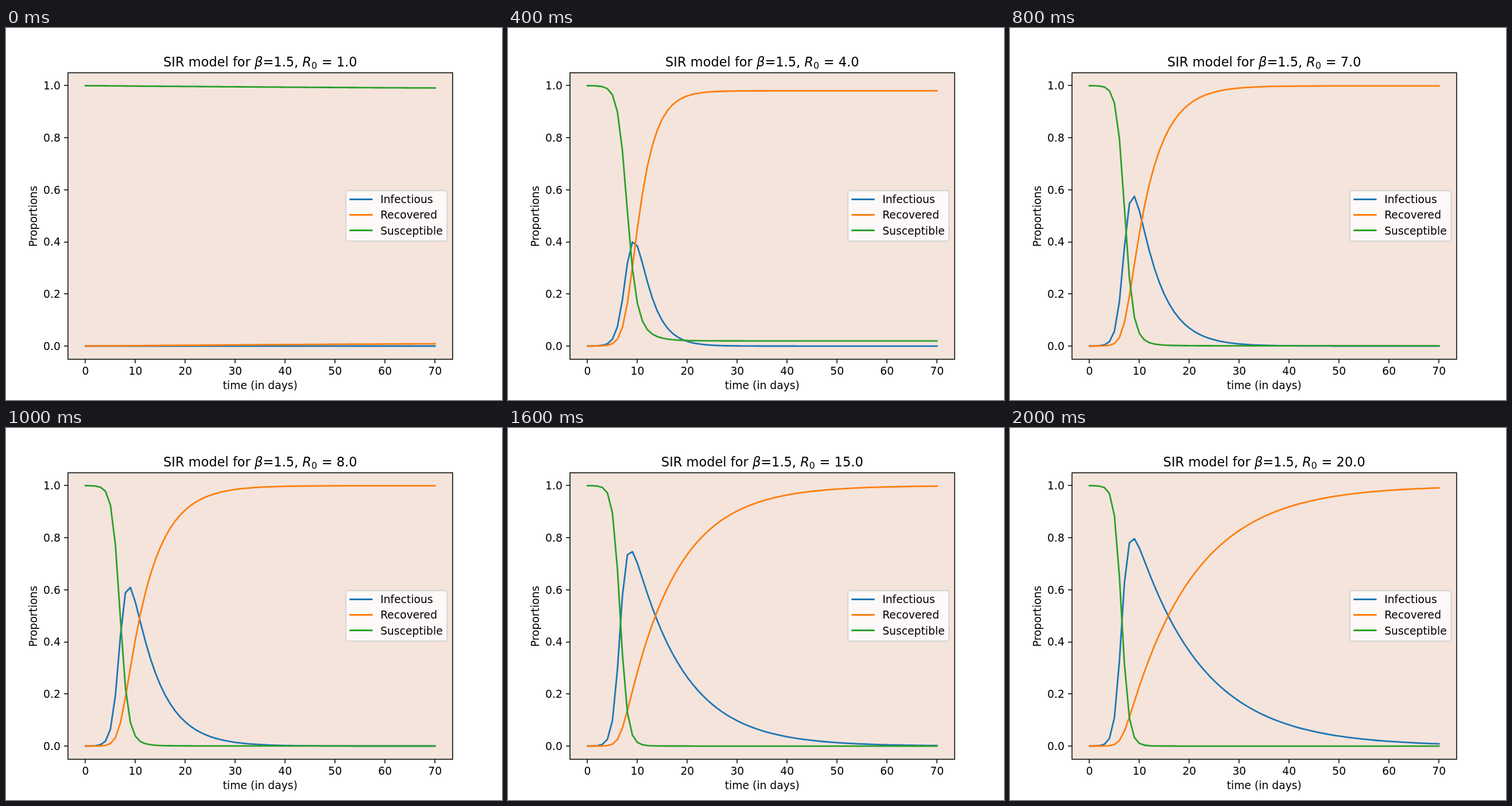
An HTML page for the animation above (2200 ms loop, 864 px wide and 648 px high).

```html
<!DOCTYPE html>
<html lang="en">
<head>
<meta charset="utf-8">
<title>SIR model</title>
<style>
  html, body { margin: 0; width: 100%; height: 100%; overflow: hidden; background: #fff; }
  svg { display: block; width: 864px; height: 648px; }
  text { font: 18.75px "DejaVu Sans", sans-serif; white-space: pre; fill: #000; }
  .title { font-size: 22.5px; }
  .title .var { font-style: italic; }
  .title .sub { font-size: 15.75px; }
  .mid { text-anchor: middle; }
  .end { text-anchor: end; }
  .line { fill: none; stroke-width: 2.8125; stroke-linecap: square; stroke-linejoin: round; }
  .axis { fill: none; stroke: #000; stroke-width: 1.5; }
</style>
</head>
<body>
<svg id="chart" viewBox="0 0 864 648">
  <rect x="108" y="78" width="670" height="499" fill="#f4e4dc"/>
  <g id="ticks"></g>
  <g id="curves"></g>
  <rect class="axis" x="108" y="78" width="670" height="499"/>
  <text class="title mid" x="442.8" y="67">SIR model for <tspan class="var">β</tspan>=1.5, <tspan class="var">R</tspan><tspan class="sub" dy="4">0</tspan><tspan id="ratio" dx=".6" dy="-4"> = 1.0</tspan></text>
  <text class="mid" x="442.8" y="629">time (in days)</text>
  <text class="mid" transform="translate(54 328) rotate(-90)">Proportions</text>
  <g id="legend">
    <rect x="592.2" y="283.3" width="176" height="88" rx="3.75" fill="#fff" fill-opacity=".8"
      stroke="#ccc" stroke-opacity=".8" stroke-width="1.875"/>
  </g>
</svg>
<script>
const BETA = 1.5, SEED = 1e-4, DAYS = 70, HOLD = 200;
const RATIOS = [1, 2, 4, 5, 7, 8, 10, 12, 15, 17, 20];
const SERIES = [
  ["Infectious", "#1f77b4"],
  ["Recovered", "#ff7f0e"],
  ["Susceptible", "#2ca02c"]
];
const $ = id => document.getElementById(id);
const px = day => 138.436 + day * 608.727 / DAYS;
const py = share => 554.04 - share * 453.6;

function add(parent, tag, attrs, text) {
  const el = document.createElementNS("http://www.w3.org/2000/svg", tag);
  for (const key in attrs) el.setAttribute(key, attrs[key]);
  if (text) el.textContent = text;
  return parent.appendChild(el);
}

// Daily [infectious, recovered, susceptible] shares, integrated with RK4.
function simulate(ratio) {
  const gamma = BETA / ratio, steps = 40, h = 1 / steps;
  const slope = ([i, , s]) => [BETA * s * i - gamma * i, gamma * i, -BETA * s * i];
  const shift = (v, k, d) => v.map((x, n) => x + k[n] * d);
  let state = [SEED, 0, 1 - SEED];
  const days = [state];
  for (let n = 1; n <= DAYS * steps; n++) {
    const a = slope(state);
    const b = slope(shift(state, a, h / 2));
    const c = slope(shift(state, b, h / 2));
    const d = slope(shift(state, c, h));
    state = state.map((x, j) => x + h / 6 * (a[j] + 2 * b[j] + 2 * c[j] + d[j]));
    if (n % steps === 0) days.push(state);
  }
  return days;
}

const toPath = (days, k) =>
  "M" + days.map((v, day) => px(day).toFixed(2) + " " + py(v[k]).toFixed(2)).join("L");

for (let day = 0; day <= DAYS; day += 10) {
  add($("ticks"), "path", { class: "axis", d: `M${Math.round(px(day))} 577v7` });
  add($("ticks"), "text", { class: "mid", x: px(day), y: 604 }, String(day));
}
for (let n = 0; n <= 5; n++) {
  const y = py(n / 5);
  add($("ticks"), "path", { class: "axis", d: `M108 ${Math.round(y)}h-7` });
  add($("ticks"), "text", { class: "end", x: 94.9, y: Math.round(y + 6.8) }, (n / 5).toFixed(1));
}

const curves = SERIES.map(([name, color], k) => {
  add($("legend"), "path", { class: "line", stroke: color, d: `M599.7 ${298.5 + 27 * k}h37.5` });
  add($("legend"), "text", { x: 652.2, y: Math.round(305 + 27.45 * k) }, name);
  return add($("curves"), "path", { class: "line", stroke: color });
});

const scenes = RATIOS.map(ratio => {
  const days = simulate(ratio);
  return {
    label: ` = ${ratio.toFixed(1)}`,
    paths: SERIES.map((_, k) => toPath(days, k)),
    legendShift: ratio === 2 ? -196 : 0
  };
});

let shown = -1;
function draw() {
  const index = Math.floor(performance.now() / HOLD) % scenes.length;
  if (index !== shown) {
    shown = index;
    const scene = scenes[index];
    $("ratio").textContent = scene.label;
    $("legend").setAttribute("transform", `translate(0 ${scene.legendShift})`);
    curves.forEach((curve, k) => curve.setAttribute("d", scene.paths[k]));
  }
  requestAnimationFrame(draw);
}
draw();
</script>
</body>
</html>
```
